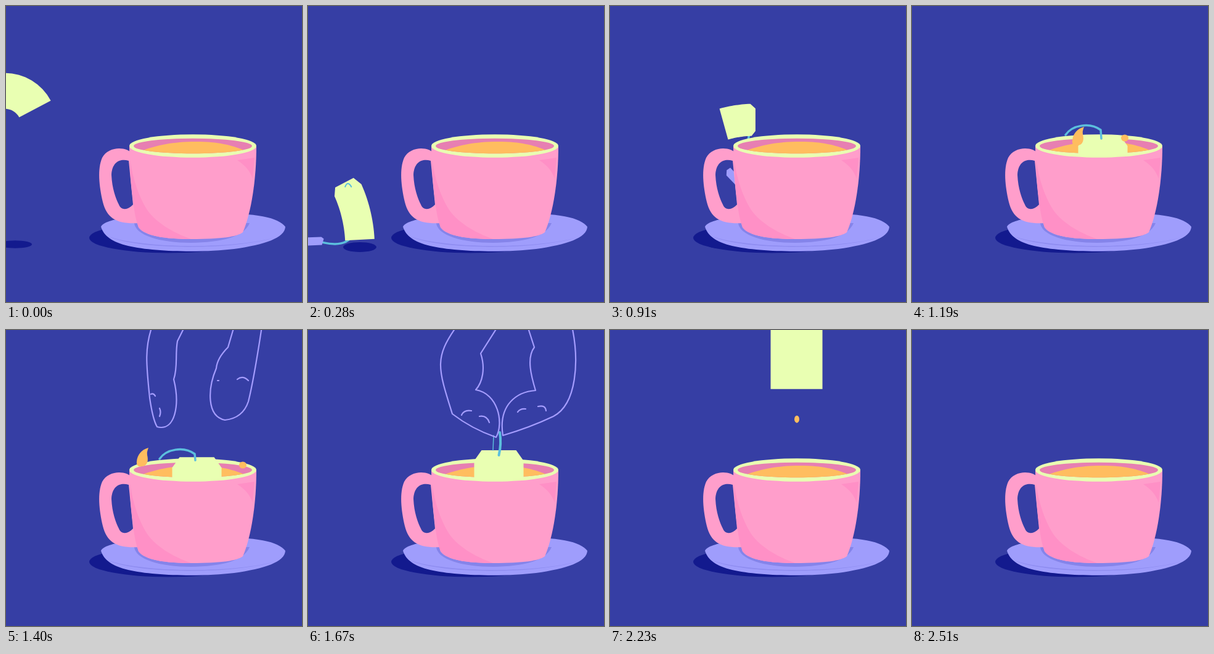
These frames come from a looping animation (480 by 480 pixels, 2580 ms). An HTML page with a canvas:

```html
<!DOCTYPE html>
<html lang="en">
<head>
<meta charset="utf-8">
<title>Tea time</title>
<style>
html, body { margin: 0; width: 100%; height: 100%; overflow: hidden; background: #363ea4; }
canvas { display: block; width: 480px; height: 480px; }
</style>
</head>
<body>
<canvas id="stage" width="480" height="480"></canvas>
<script>
const ctx = document.getElementById('stage').getContext('2d');
const LOOP = 2580, STEP = 70;
const C = {
  bg: '#363ea4', shadow: '#131a8e', saucer: '#9f9dfc', lip: '#8f8df1', shade: '#8584ea',
  cup: '#ff9ecb', cupShade: '#ff90c6', inside: '#e77fb2', tea: '#ffbd5f',
  lime: '#e9ffb2', string: '#5cbfdd', line: '#a59dff'
};

const shapes = {
  body: 'M200 228C200 275 205 322 215 359C222 369 245 378 300 378C350 378 375 374 384 367C398 335 406 280 406 228Z',
  handle: 'M206 240C195 227 166 227 156 246C148 264 151 292 157 318C164 346 182 354 216 352Z' +
    'M199 251C186 247 172 252 171 274C172 296 178 312 183 322C187 332 198 331 206 322Z',
  saucer: 'M154 358C160 346 200 339 300 336C400 334 440 341 453 358C452 376 420 387 370 394C320 400 240 399 198 389C172 383 158 372 154 358Z',
  lip: 'M166 374C215 395 365 397 438 375C370 394 230 394 166 374Z',
  cupShadow: 'M208 352C210 372 250 384 300 384C350 383 385 375 395 352Z',
  shadeLeft: 'M201 250C204 310 208 340 215 359C222 369 245 378 300 378C270 367 240 350 226 326C214 305 206 280 201 250Z',
  shadeRight: 'M375 250L403 246L400 280Q394 262 375 250Z',
  tea: 'M200 236L222 234C245 226 270 220 308 220C345 220 366 226 384 233L406 236V250H200Z',
  ripple: 'M270 230L276 225L291 223L318 220L350 222L351 214L357 209L361 214V228Z',
  drop: 'M9 -16C-3 -13 -9 -4 -10 6C-11 14 -6 15 -1 14C8 13 9 4 7 -4Q6 -9 9 -16Z',
  tag: 'M-17 -6L14 -7L18 -4L15 6L-12 7L-18 1Z',
  aboveRim: 'M0 0H480V227H406A103 17 0 0 1 200 227H0Z',
  inner: 'M207 227A96 12.3 0 0 1 399 227A96 12.3 0 0 1 207 227Z'
};
for (const name in shapes) shapes[name] = new Path2D(shapes[name]);

// Two poses of the hands with matching commands, so that one can turn into the other.
const openHands =
  'M237 -6C224 30 228 60 233 110Q238 145 245 157C275 165 282 120 272 80C279 60 274 40 278 18L290 -6' +
  'M235 104Q239 102 242 107M249 127Q252 133 249 140' +
  'M415 -6C408 40 402 80 393 116Q384 143 355 146C325 140 327 95 341 62C342 50 350 38 360 28L370 -6' +
  'M343 82Q344 82 345 82M375 80Q384 73 393 82';
const pinchHands =
  'M241 -6C205 45 210 60 234 136Q265 160 305 174C318 150 308 103 272 97C283 85 288 62 280 38L308 -6' +
  'M249 138Q253 129 265 131M278 140Q290 138 294 150' +
  'M428 -6C440 50 436 120 398 140Q360 158 316 171C308 120 340 100 369 98C362 75 354 45 367 28L356 -6' +
  'M340 133Q344 127 353 128M373 124Q385 121 386 131';

const lerp = (a, b, u) => a + (b - a) * u;
const ramp = (t, from, to) => Math.max(0, Math.min(1, (t - from) / (to - from)));
const rad = d => d * Math.PI / 180;
const hump = u => Math.sin(Math.PI * u);
const arc = u => 4 * u * (1 - u);

function morph(a, b, u) {
  const goal = b.match(/-?\d+/g);
  let i = 0;
  return a.replace(/-?\d+/g, n => lerp(+n, +goal[i++], u));
}

function fill(path, color, x = 0, y = 0, angle = 0) {
  ctx.save();
  ctx.translate(x, y);
  ctx.rotate(rad(angle));
  ctx.fillStyle = color;
  ctx.fill(path, 'evenodd');
  ctx.restore();
}

function oval(x, y, rx, ry, color) {
  ctx.beginPath();
  ctx.ellipse(x, y, rx, ry, 0, 0, 7);
  ctx.fillStyle = color;
  ctx.fill();
}

function stroke(d, color, width) {
  ctx.strokeStyle = color;
  ctx.lineWidth = width;
  ctx.stroke(new Path2D(d));
}

function clipped(path, draw) {
  ctx.save();
  ctx.clip(path);
  draw();
  ctx.restore();
}

// A point along the bent bag, from its base (s = 0) to its head (s = 1).
function spine({ x, y, heading, bend, len }, s) {
  const n = 16;
  for (let i = 0; i < n; i++) {
    const a = rad(heading + bend * s * (i + .5) / n);
    x += Math.sin(a) * len * s / n;
    y -= Math.cos(a) * len * s / n;
  }
  return { x, y, a: rad(heading + bend * s) };
}

function drawBag(bag) {
  const left = [], right = [], n = 16;
  for (let i = 0; i <= n; i++) {
    const p = spine(bag, i < n ? i / (n - 1) * .86 : 1);
    const half = bag.width / 2 * (i < n ? 1 : .7);
    const dx = Math.cos(p.a) * half, dy = Math.sin(p.a) * half;
    left.push([p.x - dx, p.y - dy]);
    right.unshift([p.x + dx, p.y + dy]);
  }
  ctx.beginPath();
  for (const p of [...left, ...right]) ctx.lineTo(...p);
  ctx.fillStyle = C.lime;
  ctx.fill();
}

// Drops in from the left, wobbles, crouches, then somersaults into the cup.
function tumblingBag(t) {
  const fall = ramp(t, 0, 210), jump = ramp(t, 700, 1120);
  const crouch = hump(ramp(t, 560, 700));
  const since = Math.max(0, t - 210);
  const wobble = Math.exp(-since / 120) * Math.sin(Math.PI * since / 140);
  return {
    x: lerp(47, 84, fall) + 201 * jump,
    y: lerp(167, 379, fall ** 1.3) - 151 * jump - 112 * arc(jump),
    heading: lerp(-28, -3, fall) + 155 * jump,
    bend: (lerp(-135, 31, ramp(t, 0, 420)) + 30 * crouch) * (1 - jump),
    len: 130 - 60 * wobble - 24 * crouch - 78 * hump(jump),
    width: lerp(58, 41, fall) + 12 * wobble + 8 * crouch + 22 * jump
  };
}

const liftAt = t => 93 * (Math.max(0, t - 1670) / 280) ** 1.25;

// Bobs in the tea, then is pulled up and out.
function steepingBag(t) {
  const soak = ramp(t, 1190, 1670), pull = ramp(t, 1670, 2230);
  return {
    x: 309.5 + 7 * hump(pull) - 7 * pull,
    y: lerp(332, 317, soak) - 6 * hump(soak * 3) * (1 - soak) - liftAt(t),
    heading: -4 * hump(pull),
    bend: 0,
    len: 122,
    width: 80 + 4 * pull
  };
}

function drawTumble(t) {
  const bag = tumblingBag(t);
  const fall = ramp(t, 0, 210), jump = ramp(t, 700, 1120);
  const tag = {
    x: lerp(-70, 27, ramp(t, 0, 350)) + 350 * jump,
    y: lerp(340, 392, ramp(t, 0, 350)) - 226 * jump
  };
  const head = spine(bag, .97), tie = spine(bag, .85);
  const high = (380 - bag.y) / 380;
  oval(bag.x - 32 * (1 - fall), 391 - high * 8, 27, 8 - high * 3, C.shadow);

  const loose = fall < 1 || jump > 0;
  const cx = loose ? tie.x - 2 : bag.x + 16;
  const cy = loose ? (tie.y + tag.y) / 2 : bag.y + 21;
  const end = jump ? tag.x : tag.x + 17;
  stroke(`M${tie.x} ${tie.y}Q${cx} ${cy} ${end} ${tag.y + 2}`, C.string, 3.5);
  fill(shapes.tag, C.saucer, tag.x, tag.y, 96 * jump);
  drawBag(bag);
  if (!loose) stroke(`M${head.x} ${head.y + 4}q4 -10 10 0`, C.string, 2);
}

function drawCup() {
  oval(263, 376, 128, 24.5, C.shadow);
  fill(shapes.saucer, C.saucer);
  fill(shapes.lip, C.lip);
  fill(shapes.cupShadow, C.shade);
  fill(shapes.handle, C.cup);
  fill(shapes.body, C.cup);
  fill(shapes.shadeLeft, C.cupShade);
  fill(shapes.shadeRight, C.cupShade);
  oval(303, 227, 103, 18.8, C.lime);
  fill(shapes.inner, C.inside);
  clipped(shapes.inner, () => fill(shapes.tea, C.tea));
}

function drawSplash(t) {
  const u = (t - 1190) / 210;
  if (u < 0 || u > 1) return;
  const hop = 20 * arc(u);
  fill(shapes.drop, C.tea, lerp(270, 222, u), lerp(212, 207, u) - hop);
  oval(lerp(345, 384, u), lerp(214, 219, u) - hop, 6, 5.5, C.tea);
}

function drawString(t, bag) {
  const head = spine(bag, 1);
  if (t < 1670) {
    stroke(`M249 209C260 193 288 188 306 201L307 ${head.y + 5}`, C.string, 3.5);
    return;
  }
  const pull = ramp(t, 1670, 1950);
  const x = 311 + 6 * pull, y = 166 - 1.42 * liftAt(t), end = head.y + 8;
  stroke(`M${x} ${y}Q${x + 3} ${(y + end) / 2} ${head.x} ${end}`, C.string, 4);
  const tail = x + lerp(-10, 3, pull);
  stroke(`M${tail} ${y + 5}L${tail - 1} ${head.y}`, C.string, 1.5);
}

function drawSteep(t) {
  const bag = t < 1190 ? tumblingBag(t) : steepingBag(t);
  clipped(shapes.aboveRim, () => drawBag(bag));
  if (t >= 1950 && t < 2020) fill(shapes.ripple, C.tea);
  drawSplash(t);
  if (t >= 1190) drawString(t, bag);
  const drip = ramp(t, 2160, 2440);
  if (drip > 0) oval(303, lerp(140, 214, drip * drip), 4, 6, C.tea);
}

function drawHands(t) {
  if (t < 1190) return;
  const reach = ramp(t, 1190, 1400), grip = ramp(t, 1400, 1670);
  ctx.save();
  ctx.translate(6 * ramp(t, 1670, 1950), -170 * (1 - reach) - 1.42 * liftAt(t));
  stroke(morph(openHands, pinchHands, grip), C.line, 2.2);
  ctx.restore();
}

// The drawings are held on a coarse beat, with one short beat before 1670 ms.
function snap(t) {
  const start = t < 1670 ? 0 : 1670;
  return start + Math.floor((t - start) / STEP) * STEP;
}

ctx.lineCap = ctx.lineJoin = 'round';
const begin = performance.now();

function frame(now) {
  const t = snap(Math.max(0, now - begin) % LOOP);
  ctx.fillStyle = C.bg;
  ctx.fillRect(0, 0, 480, 480);
  if (t < 980) drawTumble(t);
  drawCup();
  if (t >= 980 && t < 2510) drawSteep(t);
  drawHands(t);
  requestAnimationFrame(frame);
}
frame(begin);
</script>
</body>
</html>
```
